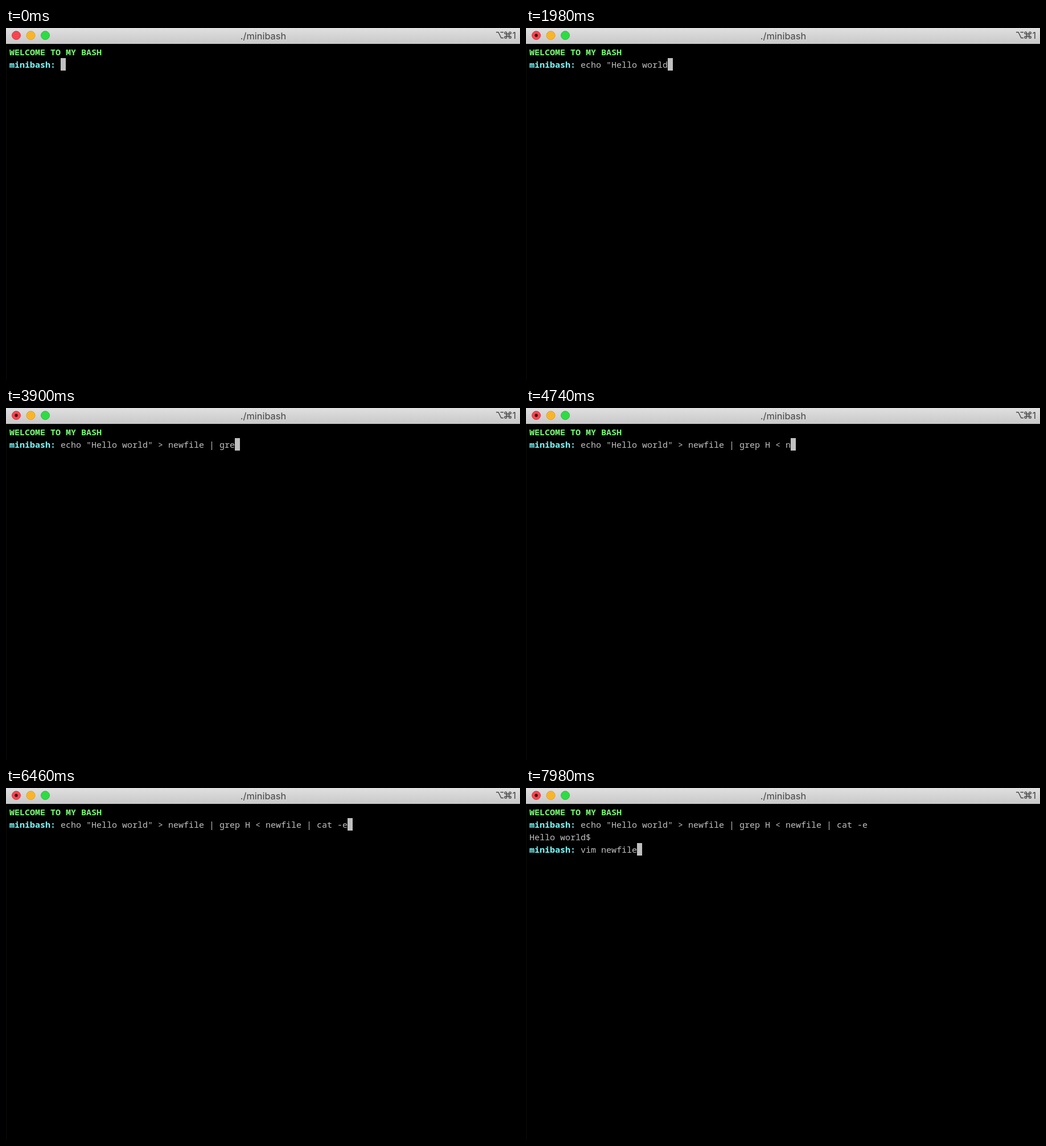
An HTML page that plays this animation: 903 px wide and 620 px high, repeating every 8000 ms.

```html
<!DOCTYPE html>
<html lang="en">
<head>
<meta charset="utf-8">
<title>./minibash</title>
<style>
  html, body { margin: 0; width: 100%; height: 100%; overflow: hidden; background: #000; }
  #bar {
    position: absolute; inset: 0 0 auto 0; height: 28px;
    background: linear-gradient(#e0e0e0, #c8c8c8); color: #444;
  }
  #bar svg { position: absolute; left: 0; top: 0; }
  #title {
    position: absolute; left: 0; width: 904px; top: 0; text-align: center;
    font: 16.4px/28px Inter, Roboto, sans-serif;
  }
  #edge { position: absolute; left: 0; top: 28px; width: 1px; bottom: 0; background: #0c0c08; }
  #term {
    position: absolute; left: 6px; top: 31px; color: #c0c0c0;
    font: 15px/22px "Noto Sans Mono", "DejaVu Sans Mono", monospace;
    font-variant-ligatures: none;
  }
  .line { height: 22px; white-space: pre; }
  .hello { color: #77fb73; font-weight: 600; }
  .prompt { color: #78fbfd; font-weight: 700; }
  #cursor { position: absolute; width: 9px; height: 22px; background: #c0c0c0; }
</style>
</head>
<body>
<div id="bar">
  <svg width="903" height="28">
    <g stroke-width="1">
      <circle cx="18" cy="13" r="7.5" fill="#f5454f" stroke="#de3a44"/>
      <circle cx="43.5" cy="13" r="7.5" fill="#f8b52c" stroke="#e0a127"/>
      <circle cx="69" cy="13" r="7.5" fill="#2fdb44" stroke="#29c23b"/>
    </g>
    <circle id="dot" cx="18" cy="13" r="2.7" fill="#3a0508"/>
    <g fill="none" stroke="#444" stroke-width="1.4">
      <path d="M861 7.500h4l5 10h4M868.500 7.500h5.500"/>
      <g id="command" transform="translate(881.7 12.500)">
        <path d="M-2 -2h4v4h-4z"/>
        <path id="loop" d="M-2 -2h-1.800a1.800 1.800 0 1 1 1.800 -1.800z"/>
        <use href="#loop" transform="rotate(90)"/>
        <use href="#loop" transform="rotate(180)"/>
        <use href="#loop" transform="rotate(270)"/>
      </g>
    </g>
    <text x="889.500" y="18.500" fill="#444" font-family="Inter, Roboto, sans-serif" font-size="16.400">1</text>
  </svg>
  <div id="title">./minibash</div>
</div>
<div id="edge"></div>
<div id="term">
  <div class="line hello">WELCOME TO MY BASH</div>
  <div class="line"><span class="prompt" id="first">minibash: </span><span id="cmd1"></span></div>
  <div id="result">
    <div class="line">Hello world$</div>
    <div class="line"><span class="prompt">minibash: </span><span id="cmd2"></span></div>
  </div>
  <div id="cursor"></div>
</div>
<script>
const LOOP = 8000, CELL = 9, ROW = 22, PROMPT = 10;
const ENTER = 6520, DOT_ON = 420, BOLD_ON = 1660;

// Each run: text, time of its first key, time of its last key
const pipeline = [
  ['echo "Hello world', 240, 1970],
  ['" > newfile', 2080, 3050],
  [' | g', 3180, 3620],
  ['rep ', 3800, 4080],
  ['H < n', 4320, 4730],
  ['ewfile |', 4840, 5610],
  [' cat -e', 5740, 6340]
];
const editor = [
  ['vim', 6900, 7150],
  [' newfile', 7260, 7920]
];

const el = id => document.getElementById(id);

function typed(runs, t) {
  return runs.map(([text, from, to]) => {
    if (t < from) return '';
    const step = (to - from) / (text.length - 1);
    return text.slice(0, 1 + Math.floor((t - from) / step + 1e-6));
  }).join('');
}

function draw(t) {
  const done = t >= ENTER;
  const first = typed(pipeline, t), second = typed(editor, t);
  el('cmd1').textContent = first;
  el('cmd2').textContent = second;
  el('result').style.display = done ? 'block' : 'none';
  el('dot').style.display = t >= DOT_ON ? 'inline' : 'none';
  el('first').style.fontWeight = t >= BOLD_ON ? 700 : 600;
  const col = PROMPT + (done ? second : first).length;
  el('cursor').style.left = col * CELL + 'px';
  el('cursor').style.top = (done ? 3 : 1) * ROW + 'px';
}

const start = performance.now();
function tick() {
  draw((performance.now() - start) % LOOP);
  requestAnimationFrame(tick);
}
draw(0);
requestAnimationFrame(tick);
</script>
</body>
</html>
```
